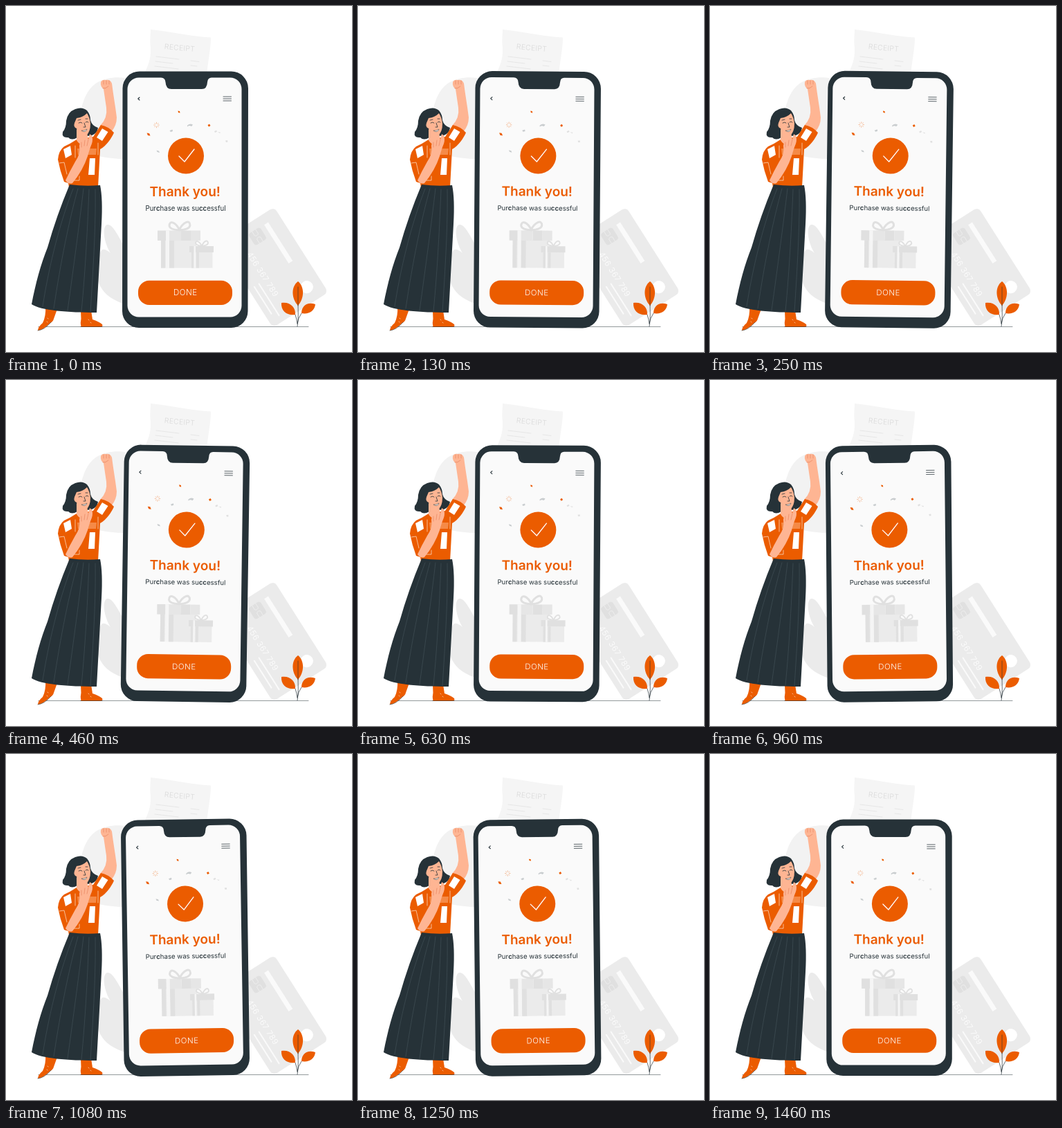
Animation, 500 px wide and 500 px high, one loop 1500 ms. Source, as an HTML page:

```html
<!DOCTYPE html>
<html lang="en">
<head>
<meta charset="utf-8">
<title>Thank you</title>
<style>
html, body { margin: 0; width: 100%; height: 100%; overflow: hidden; background: #fff; }
svg { display: block; width: 100vw; height: 100vh; }
text { font-family: Inter, sans-serif; }
.o { fill: #eb5c00; }
.d { fill: #263238; }
.s { fill: #feb593; }
.w { fill: #fff; }
.g { fill: #ebebeb; }
.e { fill: #e0e0e0; }
.line { fill: none; stroke-linecap: round; stroke-linejoin: round; }
</style>
</head>
<body>
<svg viewBox="0 0 500 500" xmlns="http://www.w3.org/2000/svg">
  <!-- backdrop -->
  <path fill="#f2f2f2" d="M172 104C158 102 143 104 131 111C116 121 107 143 108 165C112 190 132 180 138 188C139 200 133 209 134 217C144 219 158 221 172 221Z"/>
  <path class="g" d="M172 349C164 337 155 314 146 316C138 319 142 343 151 357C144 351 138 349 136 357C128 384 126 416 172 431Z"/>

  <!-- receipt -->
  <path fill="#f5f5f5" d="M209 34C238 37 267 44 296 45.500C296 62 292 78 290 100H199C204 88 210 78 209 60C207.500 50 209 42 209 34Z"/>
  <text x="251" y="64" text-anchor="middle" font-size="10.500" font-weight="300" letter-spacing=".2" fill="#d9d9d9" transform="rotate(5 251 60)">RECEIPT</text>
  <path class="line" stroke="#e3e3e3" stroke-width=".8" d="M217 73L250 77M267 79L279 80.500M216 80L241 83M267 86L276 87M215 87L249 91"/>

  <!-- bank card -->
  <g transform="translate(387.5 290.500) rotate(57.600)">
    <rect class="g" width="146" height="95" rx="7"/>
    <rect fill="#fafafa" x="14" y="19" width="66" height="7"/>
    <rect class="e" x="13" y="33" width="20" height="20" rx="4"/>
    <path class="line" stroke="#f0f0f0" stroke-width=".8" d="M13 40H20Q23 43 20 46H13M33 40H26Q23 43 26 46H33"/>
    <text x="36" y="70" font-size="11.500" font-weight="300" letter-spacing=".6" class="w">456 367 789</text>
    <circle class="w" cx="123" cy="22" r="9"/>
    <path class="line" stroke="#fafafa" stroke-width="2" d="M82 78H136M82 86H128"/>
  </g>

  <path class="line" stroke="#263238" stroke-width=".5" d="M47 463.500H437"/>

  <!-- plant -->
  <path class="line" stroke="#263238" stroke-width=".7" d="M421 463C423 452 422 440 422 430M418 446Q420 452 421 459M427 444Q422 451 421 459"/>
  <path class="o" d="M422 398C412 405 412 422 422 433C431 423 432 406 422 398ZM398 429C397 441 407 448 418 446C419 435 410 427 398 429ZM447 431C435 427 427 434 427 444C437 446 446 441 447 431Z"/>
  <path class="line" stroke="#263238" stroke-width=".6" d="M422 406V433"/>

  <!-- woman -->
  <g>
    <path class="o" d="M57 434L74 438L69 452Q68 456 64 458Q54 468 46 469Q46 464 53 458Q58 448 57 434ZM108 440H123L125 453Q134 456 139 460Q141 464 135 464H108.500Q107 458 108.500 452Z"/>
    <path class="line" stroke="#263238" stroke-width=".6" d="M46 469Q56 468 65 457M108 463.500H139"/>
    <path class="line" stroke="#fff" stroke-width=".6" d="M60 451L61 452M59 456L60 457M119 453L120 454M122 457L123 458"/>
    <path class="s" d="M137 110Q139 106 144 107Q151 106 153 112C155 128 158 145 160 161Q160 173 152 182L136 173Q147 162 145 147L141 120Q136 116 137 110Z"/>
    <path class="line" stroke="#e37c58" stroke-width=".6" d="M141 108V113M145 108V113M149 108V113M140 119Q144 120 148 116"/>
    <path class="d" d="M100 149Q110 145 117 151Q122 157 122 165Q124 173 133 176Q132 184 124 187L103 190Q95 195 90 190Q80 191 82 182Q87 176 87 166Q89 153 100 149Z"/>
    <path class="o" d="M84 203Q93 199 102 193L126 189L137 172Q148 174 156 183C152 192 145 202 136 207L133 262H91L90 256L84 254Q78 238 75 222Q76 209 84 203Z"/>
    <path class="s" d="M102 178V194Q108 204 119 197L117 181Z"/>
    <path class="s" d="M102 162Q111 161 117 155Q121 161 122 170Q122 182 116 187Q105 187 102 177Q97 175 99 169Z"/>
    <path class="line" stroke="#263238" stroke-width=".8" d="M105 169Q108 167 110 169M115 168Q117 166 119 168M104 165L108 164M115 163L118 163M113 169L115 175H112"/>
    <path d="M109 180Q113 181 117 178Q115 184 109 180Z" fill="#fff" stroke="#263238" stroke-width=".5"/>
    <!-- shirt blocks -->
    <path class="w" d="M83 207L93 202L95 215L86 220ZM121 220H129L128 244H119ZM139 177L147.500 182L139 195L131 190Z"/>
    <path fill="#f58a47" d="M103 206H131L130 215H104Z"/>
    <path class="line" stroke="#fff" stroke-width=".6" d="M100 202V219M106 246V252H96M133 215V198M77 227L84 226L88 243"/>
    <!-- front arm -->
    <path class="s" d="M86 252Q90 258 96 256Q111 238 118 217Q121 206 124 199Q126 193 124 187L121 185L119 193L117 188L114 187V194L110 190L107 188Q108 195 106 202Q108 214 100 225Q92 239 86 252Z"/>
    <path class="line" stroke="#e37c58" stroke-width=".6" d="M114 194L113 202M119 193L117 202M109 197V204"/>
    <!-- skirt -->
    <path class="d" d="M92 258Q114 261 136 259Q140 278 138 315L131 443C90 443 50 440 37 431C43 400 50 374 60 349Q73 303 92 258Z"/>
    <path class="line" stroke="#46555c" stroke-width=".6" d="M97 264C79 310 63 370 53 434M104 264C91 310 79 370 69 437M112 264C106 315 98 375 89 440M120 265C118 315 115 380 109 441M129 265C130 315 126 380 122 442"/>
  </g>

  <!-- phone -->
  <g id="phone">
    <path class="d" d="M193 94.500H325.500A24.500 24.500 0 0 1 350 119L349.500 441A24 24 0 0 1 325.500 465H192A24 24 0 0 1 168 441L168.500 119A24.500 24.500 0 0 1 193 94.500Z"/>
    <path fill="#fafafa" d="M192 103.500H224Q230 103.500 230.500 110Q231 120 239 120H283Q290.500 120 291 110Q291.500 103.500 297 103.500H324A16.500 16.500 0 0 1 340.500 120V433A16.500 16.500 0 0 1 324 449.500H192A16.500 16.500 0 0 1 175.500 433V120A16.500 16.500 0 0 1 192 103.500Z"/>
    <path class="line" stroke="#263238" stroke-width="1.100" d="M193 132L190.800 134L193 136"/>
    <path class="line" stroke="#263238" stroke-width=".75" d="M314 131H325.500M314 134H325.500M314 137H325.500"/>

    <!-- confetti -->
    <g id="burst"></g>
    <path class="o" d="M203.500 183.500L207 184L208.500 187.500L205 187ZM248.500 151.500L251 152L251.500 154.500L249 154ZM291.500 172L294 170.500L295.500 173L293 174.500Z"/>
    <path fill="#c9cdcf" d="M262 172.500Q266 169 270 171.500L268 174Q265 172 262 174.500ZM236.500 180L240.500 178.500L241 181L238 182ZM217.500 208.500L221 209.500L222 212L218.500 211Z"/>
    <path class="e" d="M301 181L304 179.500L305 181.500L302 183ZM317 194.500L320 194L320.500 196.500L318 197ZM306 182L310 182.500L309 184Z"/>

    <circle class="o" cx="260" cy="216.500" r="26"/>
    <path class="line" stroke="#fff" stroke-width="1.300" d="M250 217L258 225L272 207"/>
    <text class="o" x="258.700" y="274.500" text-anchor="middle" font-size="19" font-weight="600">Thank you!</text>
    <text class="d" x="259.500" y="295.500" text-anchor="middle" font-size="9.650">Pur<tspan font-weight="600">c</tspan>hase was su<tspan font-weight="600">cc</tspan>essful</text>

    <!-- gifts -->
    <rect class="g" x="224" y="338" width="51" height="40.500"/>
    <path class="e" d="M219 324.500H231V339H219ZM224 339H230V378.500H224ZM236 339H243V378.500H236ZM253 324.500H267V339H253Z"/>
    <path fill="#e6e6e6" d="M231 324.500H253V339H231ZM267 324.500H281V339H267Z"/>
    <path fill="#f5f5f5" d="M231 324.500H236V378.500H231Z"/>
    <path class="line" stroke="#e0e0e0" stroke-width="3" d="M251 324C245 312 236 309 236 318Q237 323 250 324C256 312 266 308 266 317Q265 323 251 324"/>
    <rect class="g" x="268" y="354" width="30.500" height="24.500"/>
    <path class="e" d="M265 347H300V356H265ZM268 356H271.500V378.500H268ZM275 356H279V378.500H275Z"/>
    <path fill="#f5f5f5" d="M271.500 347H274V378.500H271.500Z"/>
    <path class="line" stroke="#e0e0e0" stroke-width="1.900" d="M283 347C279 339 274 338 274 343Q275 346 283 347C286 339 292 337 292 343Q291 346 283 347"/>

    <rect class="o" x="191" y="396.700" width="136" height="35.200" rx="16"/>
    <text class="w" x="259.200" y="418.200" text-anchor="middle" font-size="11.500" font-weight="300" letter-spacing=".5">DONE</text>
  </g>
</svg>
<script>
const PERIOD = 1500, SWING = 1;
const phone = document.getElementById('phone');

// Ring of short rays
let rays = '';
for (let i = 0; i < 8; i++) {
  const a = i * Math.PI / 4, c = Math.cos(a), s = Math.sin(a);
  rays += `M${217.5 + 2.2 * c} ${172 + 2.2 * s}L${217.5 + 3.8 * c} ${172 + 3.8 * s}`;
}
document.getElementById('burst').innerHTML =
  `<path class="line" stroke="#eb5c00" stroke-opacity=".7" stroke-width=".55" d="${rays}"/>`;

// Triangle wave: 0, +1 at a quarter, -1 at three quarters
function sway(p) {
  if (p < 0.25) return 4 * p;
  return p < 0.75 ? 2 - 4 * p : 4 * p - 4;
}

function draw(ms) {
  const deg = SWING * sway(ms % PERIOD / PERIOD);
  phone.setAttribute('transform', `rotate(${deg.toFixed(4)} 259 279.5)`);
}

let start;
function tick(now) {
  if (start === undefined) start = now;
  draw(now - start);
  requestAnimationFrame(tick);
}
draw(0);
requestAnimationFrame(tick);
</script>
</body>
</html>
```
